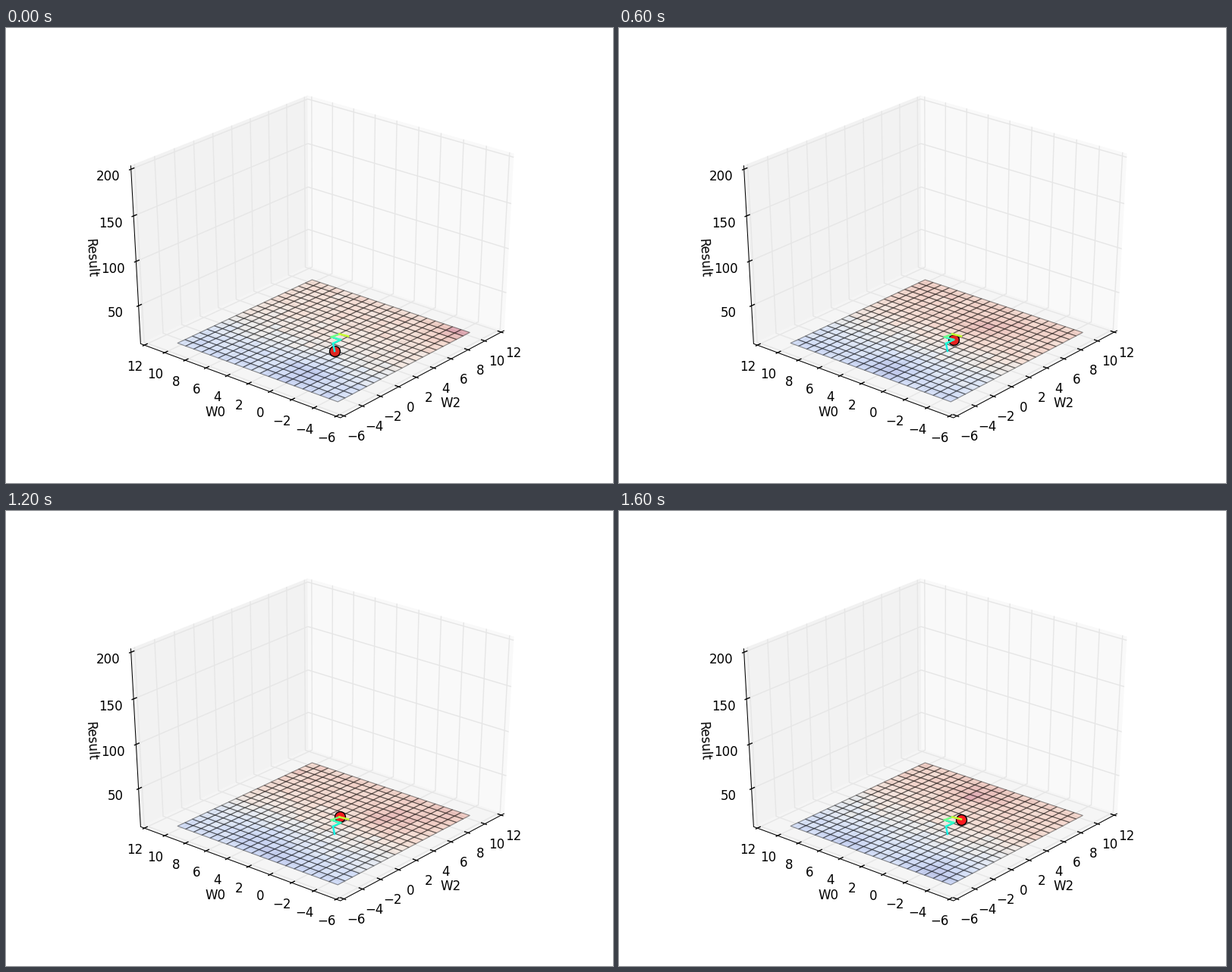
Animation, 800 px wide and 600 px high, one loop 1.8 s. Source, as a matplotlib script:

```python
import numpy as np
import matplotlib.pyplot as plt
from matplotlib import colormaps
from matplotlib.animation import FuncAnimation
from matplotlib.collections import LineCollection, PolyCollection

plt.rcParams["font.family"] = "DejaVu Sans"
PX = 0.72  # points per pixel at 100 dpi

# Camera looking at a unit cube centred on the origin
ELEV, AZIM, DIST = np.radians(30), np.radians(220), 10
H = 0.5 + 1 / 48  # half size of the padded box
CELLS = 19


def project(x, y, z):
    """Unit-cube coordinates to stage pixels."""
    toward = np.cos(AZIM) * x + np.sin(AZIM) * y
    right = -np.sin(AZIM) * x + np.cos(AZIM) * y
    up = np.cos(ELEV) * z - np.sin(ELEV) * toward
    depth = DIST - np.cos(ELEV) * toward - np.sin(ELEV) * z
    px = 100 + 620 * (right / depth + 0.095) / 0.185
    py = 540 - 480 * (up / depth + 0.095) / 0.185
    return np.stack([px, py], axis=-1)


def weight(w):
    return (w + 6) / 18 - 0.5


def height(v):
    return (v - 10) / 190 - 0.5


def path(*points):
    return np.array([project(*p) for p in points])


fig = plt.figure(figsize=(8, 6), dpi=100, facecolor="white")
ax = fig.add_axes([0, 0, 1, 1])
ax.set(xlim=(0, 800), ylim=(600, 0))
ax.axis("off")


def add_lines(segs, color, px, z, cap="butt"):
    ax.add_collection(LineCollection(segs, colors=color, linewidths=px * PX,
                                     capstyle=cap, zorder=z), autolim=False)


def label(x, y, s):
    ax.text(x, y + 6, s, fontsize=12, ha="center", va="baseline", zorder=9)


# Panes: floor, left wall, right wall
panes = [
    path((-H, -H, -H), (H, -H, -H), (H, H, -H), (-H, H, -H)),
    path((-H, H, -H), (H, H, -H), (H, H, H), (-H, H, H)),
    path((H, -H, -H), (H, H, -H), (H, H, H), (H, -H, H)),
]
ax.add_collection(PolyCollection(panes, facecolors=["0.9625", "0.95", "0.975"],
                                 edgecolors="none", zorder=1), autolim=False)

# Grid, ticks and tick labels
OUT, IN = H + 0.1 / 12, H - 0.2 / 12
grid, ticks = [], []
for w in range(-6, 13, 2):
    t = weight(w)
    grid.append(path((t, -H, -H), (t, H, -H), (t, H, H)))
    grid.append(path((-H, t, -H), (H, t, -H), (H, t, H)))
    ticks.append(path((t, -OUT, -H), (t, -IN, -H)))
    ticks.append(path((-OUT, t, -H), (-IN, t, -H)))
    name = str(w).replace("-", "\u2212")
    x, y = project(t, -H, -H)
    label(x + 16, y + 26.5, name)
    x, y = project(-H, t, -H)
    label(x - 12.5, y + 27.7, name)
for v in (50, 100, 150, 200):
    t = height(v)
    grid.append(path((-H, H, t), (H, H, t), (H, -H, t)))
    ticks.append(path((-OUT, H, t), (-IN, H, t)))
    x, y = project(-H, H, t)
    label(x - 30, y + 9, str(v))

edges = [path((H, -H, -H), (-H, -H, -H), (-H, H, -H), (-H, H, H))]
add_lines(grid, "0.9", 1.39, 2)
add_lines(edges, "black", 1.04, 3)
add_lines(ticks, "black", 1.39, 3, "projecting")
label(276, 506, "W0")
label(586, 494, "W2")
ax.text(111.5, 303, "Result", fontsize=12, rotation=-86.8,
        ha="center", va="center", zorder=9)

# Surface mesh over weights -5 to 10
nodes = weight(np.linspace(-5, 10, CELLS + 1))
gx, gy = np.meshgrid(nodes, nodes, indexing="ij")
mesh = project(gx, gy, np.full_like(gx, -0.5))
quads = np.stack([mesh[:-1, :-1], mesh[1:, :-1], mesh[1:, 1:], mesh[:-1, 1:]],
                 axis=2).reshape(-1, 4, 2)
mid = (np.arange(CELLS) + 0.5) / CELLS
S, T = np.meshgrid(mid, mid, indexing="ij")
surface = PolyCollection(quads, edgecolors=(0, 0, 0, 0.4),
                         linewidths=1.2 * PX, zorder=4)
ax.add_collection(surface, autolim=False)

# Per step: strength of the warm side, then bumps (W2, W0, amount)
STEPS = [
    (0.19, [(0.16, 0.31, -0.2), (0.98, 0.03, 0.35)]),
    (0.30, [(0.17, 0.42, -0.18), (0.15, 0.2, -0.15), (0.89, 0.34, 0.16), (0.67, 0.4, 0.18)]),
    (0.29, [(0.1, 0.45, -0.18), (0.75, 0.4, 0.16)]),
    (0.29, [(0.06, 0.49, -0.16), (0.14, 0.27, -0.15), (0.76, 0.43, 0.19), (0.86, 0.2, 0.16)]),
    (0.28, [(0.08, 0.45, -0.16), (0.75, 0.3, 0.16)]),
    (0.28, [(0.04, 0.43, -0.15), (0.18, 0.61, -0.12), (0.71, 0.27, 0.2), (0.95, 0.07, 0.1)]),
    (0.26, [(0.13, 0.86, -0.2), (0.11, 0.22, -0.2), (0.94, 0.53, 0.2)]),
    (0.28, [(0.05, 0.15, -0.17), (0.02, 0.67, -0.1), (0.86, 0.56, 0.18)]),
]


def cell_colors(step):
    warm, bumps = STEPS[step]
    slope = np.tanh(3.2 * (S - 0.38))
    v = 0.5 + np.where(slope > 0, warm, 0.29) * slope
    for s, t, amount in bumps:
        v += amount * np.exp(-((S - s) ** 2 + (T - t) ** 2) / 0.02)
    v += np.random.default_rng(step + 3).normal(0, 0.03, v.shape)
    rgba = colormaps["coolwarm"](np.clip(v, 0, 1).ravel())
    rgba[:, 3] = 0.3
    return rgba


# Ball and its trail
STOPS = np.array([(433, 425.5), (431, 416), (441, 411), (430, 408),
                  (436, 405), (439.5, 403), (439.5, 403), (450.5, 407)])
ball = ax.scatter([], [], s=100, edgecolors="black", linewidths=1.39 * PX, zorder=5)
trail = np.array([(433, 426), (431, 416), (441, 411), (429, 407.5),
                  (439.5, 403.5), (451, 406.5)])
trail_colors = ["#14f4e6", "#20ffd6", "#35ffc1", "#70ff86", "#c6ff30"]
add_lines(list(zip(trail[:-1], trail[1:])), trail_colors, 2.5, 6, "projecting")

ORDER = [0, 1, 1, 2, 3, 4, 5, 6, 7]


def update(i):
    step = ORDER[i]
    surface.set_facecolor(cell_colors(step))
    ball.set_offsets([STOPS[step]])
    ball.set_facecolor((0.87 + 0.017 * step, 0.14 - 0.006 * step, 0.12))
    return surface, ball


anim = FuncAnimation(fig, update, frames=len(ORDER), interval=200,
                     repeat=True, repeat_delay=0, blit=False)
plt.show()
```
